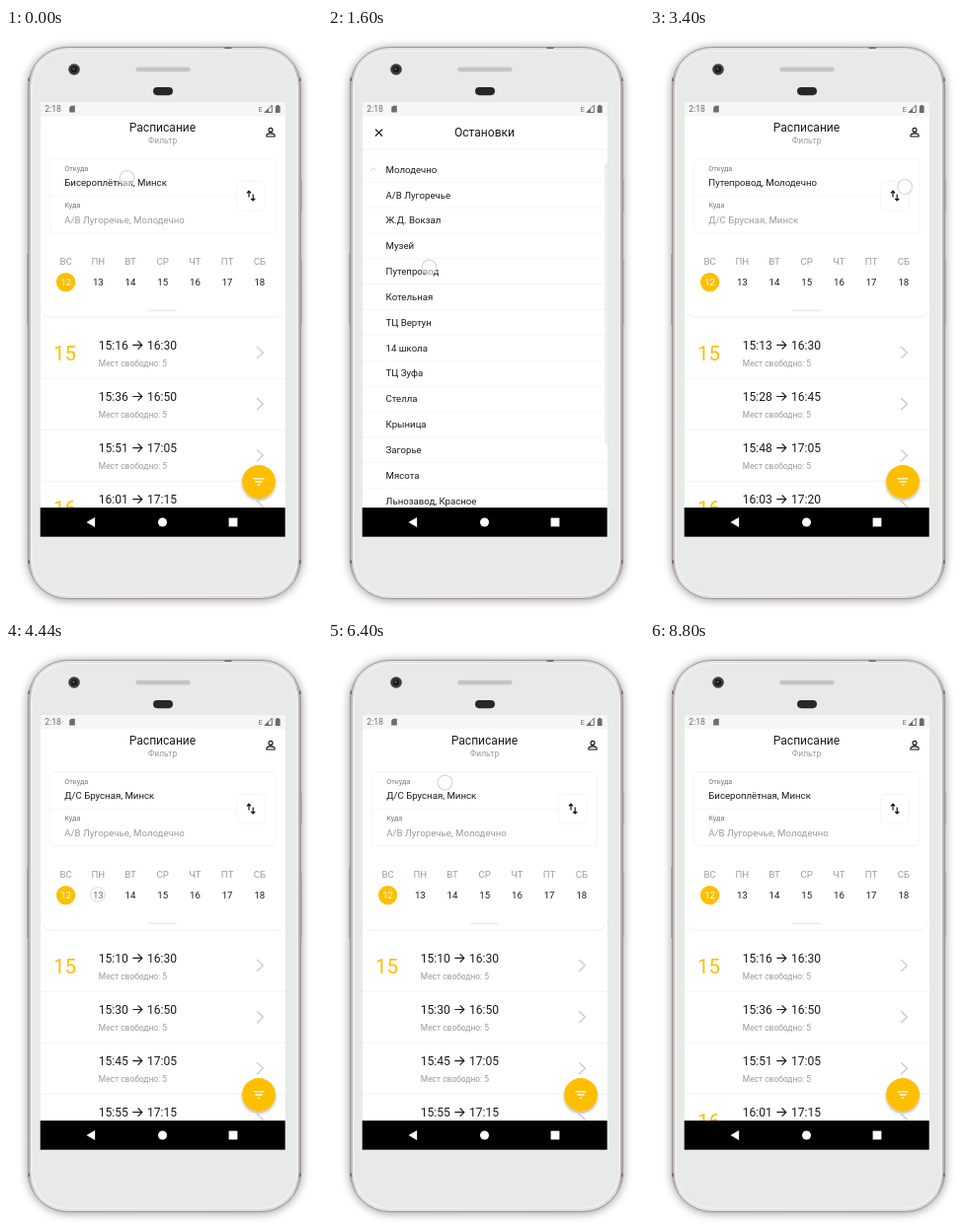
Recreate the animation shown at these times as an HTML page. Size 320 px wide and 593 px high, loop 9000 ms.

```html
<!DOCTYPE html>
<html lang="ru">
<head>
<meta charset="utf-8">
<title>Расписание</title>
<style>
  html, body { margin: 0; width: 100%; height: 100%; overflow: hidden; background: #fffffd; }
  svg { display: block; width: 100%; height: 100%; }
  text { font-family: Roboto, sans-serif; white-space: pre; }
</style>
</head>
<body>
<svg id="stage" viewBox="0 0 320 593"></svg>
<script>
const LOOP = 9000, ROW = 25.83, LIST_TOP = 123, LIST_H = 363;
const INK = '#1c1c1c', GRAY = '#9b9b9b', YELLOW = '#febf02';

const stage = document.getElementById('stage');
const $ = id => document.getElementById(id);
const clamp = v => Math.max(0, Math.min(1, v));
const ramp = (t, a, b) => clamp((t - a) / (b - a));
const ease = (t, a, b) => 1 - Math.pow(1 - ramp(t, a, b), 3);

const text = (x, y, size, s, fill = INK, extra = '') =>
  `<text x="${x}" y="${y}" font-size="${size}" fill="${fill}" ${extra}>${s}</text>`;
const mid = (x, y, size, s, fill) => text(x, y, size, s, fill, 'text-anchor="middle"');
const rect = (x, y, w, h, fill, rx = 0, extra = '') =>
  `<rect x="${x}" y="${y}" width="${w}" height="${h}" rx="${rx}" fill="${fill}" ${extra}/>`;
const line = (d, color, width = 1.2, extra = '') =>
  `<path d="${d}" fill="none" stroke="${color}" stroke-width="${width}" ${extra}/>`;

const TIMES = {
  a: ['15:16 16:30', '15:36 16:50', '15:51 17:05', '16:01 17:15'],
  b: ['15:13 16:30', '15:28 16:45', '15:48 17:05', '16:03 17:20'],
  c: ['15:10 16:30', '15:30 16:50', '15:45 17:05', '15:55 17:15'],
  d: ['06:10 07:30', '06:25 07:45', '06:40 08:00', '06:55 08:15']
};

const STATION = 'А/В Лугоречье', DEPOT = 'Д/С Брусная', LANE = 'Бисероплётная';
const HUB = STATION + ', Молодечно', START = DEPOT + ', Минск';

// when the list clears, when it loads, route, day, timetable
const EVENTS = [
  [-500, -400, LANE + ', Минск', HUB, 0, 'a'],
  [1720, 2060, 'Путепровод, Молодечно', START, 0, 'b'],
  [3520, 3840, START, HUB, 0, 'c'],
  [4480, 4760, START, HUB, 1, 'd'],
  [5280, 5600, START, HUB, 2, 'd'],
  [5920, 6160, START, HUB, 0, 'c'],
  [8360, 8680, LANE + ', Минск', HUB, 0, 'a']
];

// start, end, x, y
const TOUCHES = [
  [0, 160, 122.5, 152], [840, 1000, 110, 162], [1600, 1760, 102.5, 242.5],
  [3400, 3560, 258, 161], [4360, 4520, 93, 257], [5200, 5420, 126, 257.5],
  [5800, 5980, 60.5, 257], [6380, 6540, 118.5, 143.5], [7240, 7400, 100, 136],
  [8240, 8400, 112, 239]
];

const MINSK = ['Минск', DEPOT, 'Творожева', 'Музыкальный театр', LANE,
  'Савелия Борка (маг.Шкиф)', 'Веретишева (ТЦ Пелена)', 'Лукошнина', 'Кудреенко',
  'Радиаторный завод', 'Гребцов', '2-е кольцо (Ромбусбанк)', 'Фени Подлозки',
  'Веснянка (маг.Лозоборовский)'];
const MOLO = ['Молодечно', STATION, 'Ж.Д. Вокзал', 'Музей', 'Путепровод', 'Котельная',
  'ТЦ Вертун', '14 школа', 'ТЦ Зуфа', 'Стелла', 'Крыница', 'Загорье', 'Мясота',
  'Льнозавод, Красное'];
const MINSK_STOPS = 23, MOLO_STOPS = 16;

function phone() {
  return rect(22, 20, 277, 560, '#5f5b5a', 41, 'opacity=".62" filter="url(#soft)"') +
    rect(296.5, 153, 3.4, 33, '#b9b2b0', 1) + rect(296.5, 234, 3.4, 67, '#b9b2b0', 1) +
    rect(22.5, 19.5, 276, 559, 'url(#rim)', 40, 'stroke="#9d9795" stroke-width="1"') +
    rect(25, 22, 271, 554, '#f1eeed', 37.5) +
    rect(27, 24, 267, 550, '#e7eae7', 36) +
    line('M221.5 20.2h7M23.2 50.5v3.5M297.8 50.5v3.5M23.2 539.5v3.5M297.8 539.5v3.5', '#6f6a69', 1.6) +
    line('M22 229v72', '#8f8987', .9) +
    '<circle cx="69" cy="42" r="5.8" fill="#3b3d40"/><circle cx="69" cy="42" r="3.2" fill="#15181d"/>' +
    '<circle cx="68.5" cy="41.5" r="1.2" fill="#4c596b"/>' +
    rect(131.3, 39.8, 55.4, 4.4, '#c3c3c1', 2.2, 'stroke="#d8d8d5" stroke-width=".8"') +
    rect(149, 60, 20, 8.2, '#262728', 4.1);
}

function statusBar() {
  const c = '#6c6c6c';
  return rect(35, 75, 248, 14.5, '#f6f6f6') + text(39.3, 85.2, 8.6, '2:18', c) +
    `<path d="M66 78.8h3.8v6.6h-5.6v-4.8z" fill="${c}"/>` +
    text(255.8, 85, 7.2, 'E', c) +
    line('M262 85.5h7.3v-7.3z', c, 1) + `<path d="M262 85.5h4v-4z" fill="${c}"/>` +
    rect(272.8, 79, 4.8, 7, c, .6) + rect(274, 78, 2.4, 1.4, c);
}

function navBar() {
  return rect(34.7, 486.2, 248, 29.5, '#000') +
    '<path d="M81.5 501l8.6-5v10z" fill="#fff"/><circle cx="158.5" cy="501" r="4.5" fill="#fff"/>' +
    rect(225.6, 496.6, 8.8, 8.8, '#fff');
}

function panel() {
  const edge = 'stroke="#f4f4f4" stroke-width=".9"';
  const names = ['ВС', 'ПН', 'ВТ', 'СР', 'ЧТ', 'ПТ', 'СБ'];
  return '<path d="M35 89.5h248v190q0 13-12 13H47q-12 0-12-13z" fill="#fff" filter="url(#lift)"/>' +
    mid(158.5, 105, 12.06, 'Расписание') + mid(158.5, 117.2, 8.44, 'Фильтр', GRAY) +
    '<circle cx="268" cy="103.4" r="2" fill="none" stroke="#111" stroke-width="1.1"/>' +
    line('M263.9 110v-1c0-1.5 2.3-2.1 4.1-2.1s4.1.6 4.1 2.1v1z', '#111', 1.1) +
    rect(44.4, 132.8, 228.4, 75, '#fff', 4, edge) + line('M44.4 170.3h189', '#f4f4f4', .9) +
    text(59.3, 145, 7.24, 'Откуда', '#777') + text(59.3, 182, 7.24, 'Куда', '#777') +
    '<g id="route"></g>' +
    rect(233.6, 155.4, 29, 29.8, '#fff', 5, edge) +
    line('M246 171.5v-6M243.9 167.4l2.1-2.2 2.1 2.2M250.2 168.6v6M248.1 172.8l2.1 2.2 2.1-2.2', '#111') +
    names.map((n, i) => mid(60.6 + 32.7 * i, 240.4, 9.65, n, GRAY)).join('') +
    '<g id="days"></g>' + rect(144, 285.6, 29, 1.6, '#ebebeb', .8);
}

function fab() {
  return `<circle cx="256" cy="460" r="16.9" fill="${YELLOW}" filter="url(#drop)"/>` +
    line('M250.6 456.8h10.8M252.4 460h7.2M254.7 463.2h2.6', '#fff', 1.3);
}

function trips(list) {
  let hour = '';
  return list.map((trip, i) => {
    const [from, to] = trip.split(' '), y = 52.1 * i, h = from.slice(0, 2);
    const label = h === hour ? '' : text(48, 337.4, 20.5, h, YELLOW);
    hour = h;
    return `<g transform="translate(0 ${y})">${label}` +
      text(93.8, 326, 12.06, from) + text(143, 326, 12.06, to) +
      line('M128.3 321.4h9.2M133.6 317.2l4.2 4.2-4.2 4.2', INK, 1.2) +
      text(93.8, 342.8, 8.44, 'Мест свободно: 5', GRAY) +
      line('M254 323l6.3 6-6.3 6', '#d0d0d0', 1.5) +
      line('M35 355.2h248', '#f2f2f2', .9) + '</g>';
  }).join('');
}

function days(active) {
  return `<circle cx="${60.6 + 32.7 * active}" cy="257.6" r="9.7" fill="${YELLOW}"/>` +
    [0, 1, 2, 3, 4, 5, 6].map(i =>
      mid(60.6 + 32.7 * i, 261.1, 9.65, 12 + i, i === active ? '#fff' : INK)).join('');
}

function section(id, names, checked) {
  const rows = names.map((n, i) => {
    const y = ROW * i;
    const check = i < checked ? line(`M260.4 ${y + 13}l3.2 3.2 7-7`, YELLOW, 1.3) : '';
    return text(58.6, y + 16.3, 9.65, n) + check +
      line(`M35 ${y + ROW}h248`, '#f4f4f4', .9);
  }).join('');
  return `<clipPath id="${id}Clip"><rect id="${id}Box" x="35" width="248"/></clipPath>` +
    `<g id="${id}"><g clip-path="url(#${id}Clip)">${rows}</g>` +
    line('M-2.8 1.4L0-1.4l2.8 2.8', '#d2d2d2', 1, `id="${id}Arrow"`) + '</g>';
}

function stops() {
  return rect(35, 89.5, 248, 427, '#fff') + '<g clip-path="url(#list)">' +
    section('minsk', MINSK, 2) + section('molo', MOLO, 0) +
    '<rect id="thumb" x="280.3" width="2.5" fill="#ededed"/></g>' +
    rect(35, 89.5, 248, 33, '#fff', 0, 'filter="url(#lift)"') +
    mid(158.5, 110.4, 12.06, 'Остановки') +
    line('M48 102.6l7 7M55 102.6l-7 7', '#111', 1.3);
}

const shadow = (id, dy, blur, alpha) => `<filter id="${id}" x="-30%" y="-30%" width="160%" height="170%">
  <feDropShadow dx="0" dy="${dy}" stdDeviation="${blur}" flood-opacity="${alpha}"/></filter>`;

stage.innerHTML = `<defs>
  <linearGradient id="rim"><stop offset="0" stop-color="#b9b2b0"/><stop offset=".03" stop-color="#e6e1e0"/>
    <stop offset=".97" stop-color="#ded8d7"/><stop offset="1" stop-color="#b0a9a7"/></linearGradient>
  <filter id="soft" x="-10%" y="-10%" width="120%" height="120%"><feGaussianBlur stdDeviation="5"/></filter>
  ${shadow('lift', .6, .7, .13)}${shadow('drop', 1.8, 1.8, .3)}
  <clipPath id="screen"><rect x="35" y="89.5" width="248" height="397"/></clipPath>
  <clipPath id="list"><rect x="35" y="${LIST_TOP}" width="248" height="${LIST_H}"/></clipPath>
</defs>
${phone()}
${rect(35, 75, 248, 440.7, '#fff')}
<g clip-path="url(#screen)">
  <g id="trips"></g>${panel()}${fab()}
  <g id="page">${stops()}</g>
</g>
${statusBar()}${navBar()}
<circle id="touch" r="7.4" fill="#fff" fill-opacity=".5" stroke="#d4d4d4" stroke-opacity=".85" stroke-width="1.3"/>`;

let shown = null;

function set(id, attrs) {
  for (const k in attrs) $(id).setAttribute(k, attrs[k]);
}

function placeSection(id, y, open, count) {
  const height = ROW * (1 + count * open);
  set(id, { transform: `translate(0 ${y})` });
  set(id + 'Box', { height });
  set(id + 'Arrow', { transform: `translate(46 12.6) scale(1 ${2 * open - 1})` });
  return y + height;
}

function drawSchedule(t) {
  const event = EVENTS.filter(e => e[0] <= t).pop();
  const [, load, from, to, day, key] = event;
  if (event !== shown) {
    shown = event;
    $('route').innerHTML = text(59.3, 160.3, 9.65, from) + text(59.3, 197.6, 9.65, to, GRAY);
    $('days').innerHTML = days(day);
    $('trips').innerHTML = trips(TIMES[key]);
  }
  set('trips', { opacity: ramp(t, load, load + 110) });
}

function drawStops(t) {
  const p = t < 5000 ? ease(t, 150, 480) - ease(t, 1720, 2020)
                     : ease(t, 6640, 7040) - ease(t, 8360, 8660);
  set('page', { opacity: p, transform: `translate(0 ${20 * (1 - p)})`, display: p > 0 ? 'inline' : 'none' });

  const openMinsk = t < 8800 ? ease(t, 7340, 7740) : 0;
  const openMolo = t < 2160 ? ease(t, 920, 1240) : 0;
  const scroll = t < 2160 ? 18.3 * ease(t, 1040, 1320) : 0;
  const next = placeSection('minsk', LIST_TOP - scroll, openMinsk, MINSK_STOPS);
  placeSection('molo', next, openMolo, MOLO_STOPS);

  const content = ROW * (2 + MINSK_STOPS * openMinsk + MOLO_STOPS * openMolo);
  set('thumb', {
    y: LIST_TOP + scroll * LIST_H / content,
    height: LIST_H * LIST_H / content,
    opacity: content > LIST_H ? 1 : 0
  });
}

function drawTouch(t) {
  const hit = TOUCHES.find(([a, b]) => t >= a && t < b);
  if (hit) set('touch', { cx: hit[2], cy: hit[3] });
  set('touch', { opacity: hit ? 1 - ramp(t, hit[1] - 110, hit[1]) : 0 });
}

function draw(t) {
  drawSchedule(t);
  drawStops(t);
  drawTouch(t);
}

const begin = performance.now();
function tick() {
  draw((performance.now() - begin) % LOOP);
  requestAnimationFrame(tick);
}
draw(0);
requestAnimationFrame(tick);
</script>
</body>
</html>
```
